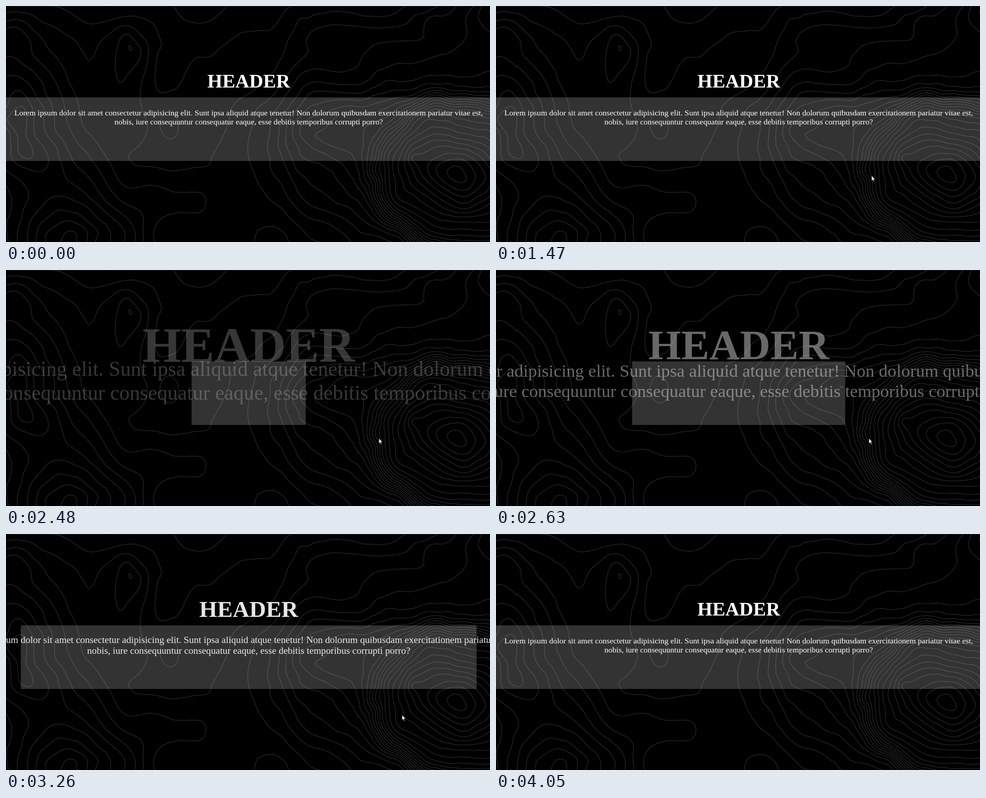
An HTML page with a canvas that plays this animation: 1068x524 px, repeating every 4.12 s.

```html
<!DOCTYPE html>
<html lang="en">
<head>
<meta charset="utf-8">
<title>Header reveal</title>
<style>
  html, body { margin: 0; width: 100%; height: 100%; overflow: hidden; background: #000; }
  canvas { display: block; }
</style>
</head>
<body>
<canvas id="stage" width="1068" height="524"></canvas>
<script>
const W = 1068, H = 524, MID = 535.5, PAGE = 1071, LOOP = 4120;
const REVEAL = 2320, TICK = 77.5;
const SERIF = '"Liberation Serif", "Times New Roman", serif';
const ctx = document.getElementById('stage').getContext('2d');

// Hills of the contour map: x, y, radius x, radius y, height
const hills = [
  [1009, 377, 200, 165, 18],
  [901, 343, 22, 22, 1.6],
  [1075, 10, 110, 130, 6],
  [933, 25, 26, 26, 1.8],
  [760, 248, 120, 65, 3.5],
  [680, 288, 120, 105, 5],
  [690, 65, 110, 50, 2.5],
  [275, 88, 50, 75, 3.4],
  [357, 260, 30, 32, 1.4],
  [20, 55, 110, 90, 4],
  [27, 252, 95, 120, 9],
  [44, 331, 18, 24, 1.6],
  [140, 528, 160, 150, 11],
  [480, 545, 90, 80, 2]
];

// Smooth value noise from -1 to 1
function hash(x, y, seed) {
  const v = Math.sin(x * 127.1 + y * 311.7 + seed * 74.7) * 43758.5453;
  return (v - Math.floor(v)) * 2 - 1;
}

function noise(x, y, size, seed) {
  x /= size;
  y /= size;
  const i = Math.floor(x), j = Math.floor(y);
  const ease = v => v * v * (3 - 2 * v);
  const mix = (a, b, k) => a + (b - a) * k;
  const u = ease(x - i), v = ease(y - j);
  return mix(
    mix(hash(i, j, seed), hash(i + 1, j, seed), u),
    mix(hash(i, j + 1, seed), hash(i + 1, j + 1, seed), u), v);
}

function height(px, py) {
  const x = px + 14 * noise(px, py, 72, 1) + 4 * noise(px, py, 28, 2);
  const y = py + 14 * noise(px, py, 72, 3) + 4 * noise(px, py, 28, 4);
  let h = 0.8 * noise(px, py, 85, 5);
  for (const [cx, cy, rx, ry, top] of hills) {
    const d = Math.hypot((x - cx) / rx, (y - cy) / ry, 0.2) - 0.2;
    h += top * Math.exp(-d);
  }
  // Steep rim around the large eastern peak
  const rim = Math.hypot(x - 1009, (y - 377) * 1.2);
  return h + 4 * Math.tanh((200 - rim) / 32);
}

// Marching squares at every whole height
function drawMap(pen, cell) {
  const cols = Math.ceil(W / cell), rows = Math.ceil(H / cell);
  const grid = [];
  for (let j = 0; j <= rows; j++) {
    grid.push(Array.from({ length: cols + 1 }, (_, i) => height(i * cell, j * cell)));
  }
  pen.fillStyle = '#000';
  pen.fillRect(0, 0, W, H);
  pen.fillStyle = '#222';
  pen.fillRect(0, 0, W, 1);
  pen.strokeStyle = '#272727';
  pen.lineWidth = 1.4;
  pen.lineCap = 'round';
  pen.beginPath();
  for (let j = 0; j < rows; j++) {
    for (let i = 0; i < cols; i++) {
      const corners = [[i, j], [i + 1, j], [i + 1, j + 1], [i, j + 1]];
      const z = corners.map(([a, b]) => grid[b][a]);
      const max = Math.max(...z);
      for (let level = Math.ceil(Math.min(...z)); level < max; level++) {
        const cuts = [];
        corners.forEach(([ax, ay], k) => {
          const n = (k + 1) % 4, [bx, by] = corners[n];
          if ((z[k] < level) === (z[n] < level)) return;
          const f = (level - z[k]) / (z[n] - z[k]);
          cuts.push([(ax + (bx - ax) * f) * cell, (ay + (by - ay) * f) * cell]);
        });
        for (let k = 0; k + 1 < cuts.length; k += 2) {
          pen.moveTo(...cuts[k]);
          pen.lineTo(...cuts[k + 1]);
        }
      }
    }
  }
  pen.stroke();
}

const map = document.createElement('canvas');
map.width = W;
map.height = H;
drawMap(map.getContext('2d'), 4);

// Pointer stops: time, x, y (no position: hidden)
const stops = [
  [0], [130, 983, 477], [210, 890, 425], [290, 835, 382], [460, 832, 380],
  [1470, 829, 377], [1550, 823, 376], [1780, 813, 365], [1860, 823, 374], [3190, 834, 380],
  [3260, 874, 402], [3340, 938, 451], [3410, 1010, 505], [3490],
  [3970, 1037, 522], [4050]
];

function pointer(t) {
  const [, x, y] = stops.filter(s => s[0] <= t).pop();
  if (x === undefined) return;
  ctx.save();
  ctx.translate(x, y);
  ctx.beginPath();
  [[0, 0], [0, 11], [2.4, 8.8], [4.3, 13], [5.9, 12.3], [4.1, 8.2], [7.4, 8]]
    .forEach(p => ctx.lineTo(...p));
  ctx.closePath();
  ctx.fillStyle = '#fff';
  ctx.fill();
  ctx.strokeStyle = '#000';
  ctx.lineWidth = 0.6;
  ctx.stroke();
  ctx.restore();
}

function label(text, font, scale, y, base) {
  ctx.save();
  ctx.translate(MID, y);
  ctx.scale(scale, scale);
  ctx.font = font + ' ' + SERIF;
  ctx.fillText(text, 0, base);
  ctx.restore();
}

const easeOut = x => 1 - (1 - Math.min(x, 1)) ** 2;

function content(t) {
  // The reveal advances in even screen refreshes
  const since = Math.floor((t - REVEAL) / TICK) * TICK;
  const grow = t < REVEAL ? 1 : easeOut(since / 1235);
  const show = t < REVEAL ? 1 : easeOut(since / 1350);
  const scale = 3 - 2 * show;

  ctx.fillStyle = 'rgba(255,255,255,.2)';
  ctx.fillRect(MID - PAGE * grow / 2, 203, PAGE * grow, 141);

  ctx.globalAlpha = show;
  ctx.fillStyle = '#fff';
  ctx.textAlign = 'center';
  label('HEADER', 'bold 42.67px', scale, 166.8, 14.3);
  // Text at rest sets slightly tighter than scaled text
  const body = scale > 1 ? '17.78px' : '17.64px';
  label('Lorem ipsum dolor sit amet consectetur adipisicing elit. Sunt ipsa aliquid atque tenetur! ' +
    'Non dolorum quibusdam exercitationem pariatur vitae est,', body, scale, 247.2, -4.6);
  label('nobis, iure consequuntur consequatur eaque, esse debitis temporibus corrupti porro?',
    body, scale, 247.2, 15.9);
  ctx.globalAlpha = 1;
}

function draw() {
  const t = performance.now() % LOOP;
  ctx.drawImage(map, 0, 0);
  content(t);
  pointer(t);
  requestAnimationFrame(draw);
}
draw();
</script>
</body>
</html>
```
